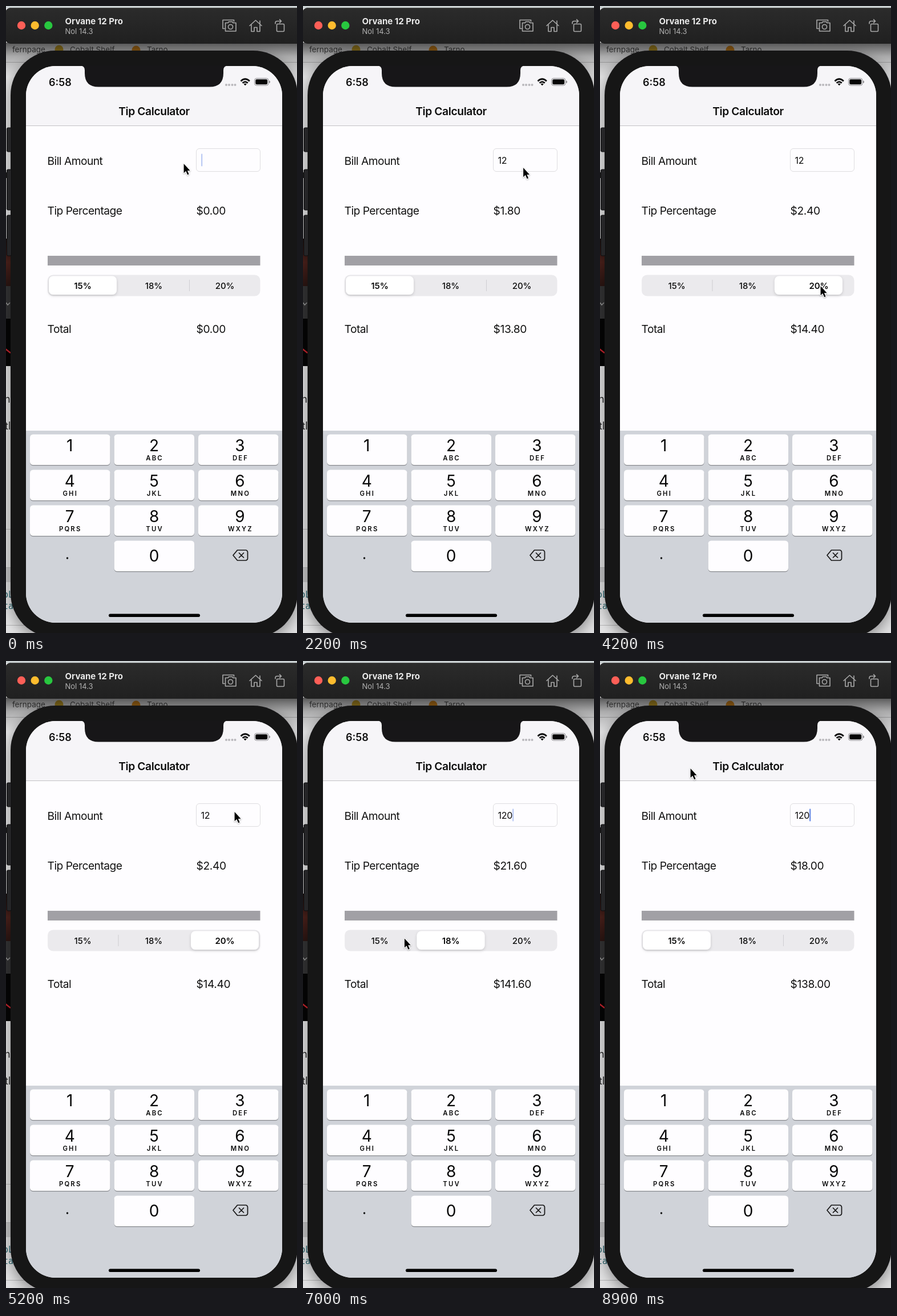
Recreate the animation shown at these times as an HTML page. Size 510 by 1097 pixels, loop 9 s.

```html
<!DOCTYPE html>
<html lang="en">
<head>
<meta charset="utf-8">
<title>Tip Calculator</title>
<style>
html, body { margin: 0; width: 100%; height: 100%; overflow: hidden; background: #e4e4e5; }
svg { display: block; width: 510px; height: 1097px; font-family: Inter, "Liberation Sans", sans-serif; }
.label { font-size: 19.2px; letter-spacing: -.5px; fill: #111; }
.value { letter-spacing: -.35px; }
.mid { text-anchor: middle; }
.seg { font-size: 15px; font-weight: 500; fill: #0c0c0c; text-anchor: middle; letter-spacing: -.1px; }
.digit { font-size: 28px; text-anchor: middle; fill: #080808; }
.letters { font-size: 11.3px; font-weight: 600; letter-spacing: 2.2px; text-anchor: middle; fill: #080808; }
.icon { fill: none; stroke: #a9a9a9; stroke-width: 1.6; stroke-linejoin: round; stroke-linecap: round; }
</style>
</head>
<body>
<svg viewBox="0 0 510 1097">
  <defs>
    <linearGradient id="shade" x2="0" y2="1">
      <stop offset="0" stop-opacity=".62"/>
      <stop offset=".4" stop-opacity=".25"/>
      <stop offset="1" stop-opacity="0"/>
    </linearGradient>
    <linearGradient id="title" x2="0" y2="1">
      <stop offset="0" stop-color="#2b2b2b"/>
      <stop offset="1" stop-color="#202020"/>
    </linearGradient>
    <linearGradient id="photo" x2="0" y2="1">
      <stop offset="0" stop-color="#1d0f0e"/>
      <stop offset=".5" stop-color="#4c211b"/>
      <stop offset="1" stop-color="#2a1512"/>
    </linearGradient>
    <filter id="soft" x="-20%" y="-30%" width="140%" height="180%">
      <feDropShadow dx="0" dy="2" stdDeviation="2.5" flood-opacity=".16"/>
    </filter>
    <filter id="drop" x="-50%" y="-50%" width="200%" height="200%">
      <feDropShadow dx="0" dy="1" stdDeviation="1" flood-opacity=".35"/>
    </filter>
    <filter id="glow">
      <feDropShadow dx="0" dy="8" stdDeviation="13" flood-opacity=".4"/>
    </filter>
  </defs>

  <!-- desktop behind the simulator -->
  <rect width="510" height="1097" fill="#e4e4e5"/>
  <rect width="510" height="4" fill="#cbd2d4"/>
  <g font-size="13.5" fill="#4b4b4b">
    <text x="11" y="81">fernpage</text>
    <circle cx="93" cy="76" r="7.5" fill="#c9a227"/>
    <text x="112" y="81">Cobalt Shelf</text>
    <circle cx="228" cy="77" r="7.5" fill="#d98a1c"/>
    <text x="247" y="81">Tarno</text>
  </g>
  <rect y="98" width="510" height="1" fill="#b4b4b5"/>
  <rect y="407" width="12" height="83" fill="url(#photo)"/>
  <rect y="490" width="12" height="57" fill="#343435"/>
  <path d="M0 519l3 4 4-4" fill="none" stroke="#999" stroke-width="1.5"/>
  <rect y="547" width="12" height="83" fill="#050505"/>
  <path d="M-1 600l9 7" stroke="#c8242e" stroke-width="2.5"/>
  <g font-size="18" fill="#222">
    <text x="-8" y="301">u</text>
    <text x="-3" y="694">n</text>
    <text x="-2" y="741">tl</text>
  </g>
  <path d="M0 915.500H12M0 982.500H12M0 1083.500H40" stroke="#b5b5b6"/>
  <rect y="983" width="12" height="25" fill="#c8c8c9"/>
  <g font-size="15" fill="#24626b" font-family="'DejaVu Sans Mono', monospace">
    <text x="-5" y="1035">oL</text>
    <text x="-5" y="1055">ta</text>
  </g>
  <rect y="64" width="510" height="60" fill="url(#shade)"/>

  <!-- phone -->
  <rect x="8" y="78" width="503" height="1027" rx="78" fill="#171618" filter="url(#glow)"/>
  <g fill="#252527" stroke="#0d0d0e">
    <rect x="1.500" y="213" width="8" height="42" rx="2"/>
    <rect x="1.500" y="286" width="8" height="71" rx="2"/>
    <rect x="1.500" y="366" width="8" height="71" rx="2"/>
  </g>
  <rect x="35" y="105" width="449" height="974" rx="52" fill="#fefdff"/>
  <path d="M35 210V157a52 52 0 0 1 52-52H432a52 52 0 0 1 52 52V210Z" fill="#f6f5f8"/>
  <path d="M35 209.500H484" stroke="#c2c1c5"/>
  <path d="M130 104.500q8 0 8 8v5q0 24 24 24H357q24 0 24-24v-5q0-8 8-8Z" fill="#171618"/>
  <text x="75" y="139.500" font-size="18" font-weight="600" fill="#111">6:58</text>
  <g fill="#b9b8bc">
    <circle cx="386" cy="138" r="2"/><circle cx="391" cy="138" r="2"/>
    <circle cx="396.500" cy="138" r="2"/><circle cx="401.500" cy="138" r="2"/>
  </g>
  <g fill="none" stroke="#0a0a0a" stroke-width="2.700">
    <path d="M411.500 131.500q7.700-7.500 15.400 0M414.600 134.800q4.600-4.400 9.200 0"/>
  </g>
  <path d="M416.600 136.600q2.600-2.200 5.200 0l-2.600 2.700Z" fill="#0a0a0a"/>
  <rect x="435.500" y="126.500" width="24.500" height="12.500" rx="3.600" fill="none" stroke="#8b8a8e"/>
  <rect x="437.200" y="128.200" width="21" height="9" rx="2.200" fill="#050505"/>
  <path d="M461.600 130.800q2 2 0 4Z" fill="#8b8a8e" stroke="#8b8a8e"/>
  <text class="mid" x="259.500" y="190.800" font-size="19.2" font-weight="600" letter-spacing="-.35" fill="#0c0c0c">Tip Calculator</text>

  <!-- form -->
  <g class="label">
    <text x="72.500" y="277.500">Bill Amount</text>
    <text x="72.500" y="365">Tip Percentage</text>
    <text x="72.500" y="571.500">Total</text>
    <text id="tip" class="value" x="333.500" y="365"></text>
    <text id="total" class="value" x="333.500" y="571.500"></text>
  </g>
  <rect x="333.500" y="249.500" width="112" height="40" rx="5.500" fill="#fefdff" stroke="#dedde0"/>
  <text id="bill" x="341.500" y="275.500" font-size="16" letter-spacing="-.25" fill="#0c0c0c"></text>
  <rect id="caret" y="258.500" width="2.300" height="22" rx="1" fill="#3563dd"/>
  <rect x="73" y="437" width="372.500" height="17" fill="#a1a0a5"/>
  <rect x="73" y="470.500" width="372.500" height="37" rx="9.500" fill="#ebeaed"/>
  <rect class="divider" x="196.500" y="479" width="1" height="20" fill="#cfced2"/>
  <rect class="divider" x="321" y="479" width="1" height="20" fill="#cfced2"/>
  <rect id="thumb" y="472.500" width="119" height="32.500" rx="8" fill="#fff" filter="url(#soft)"/>
  <text class="seg" x="134.500" y="494.500">15%</text>
  <text class="seg" x="259" y="494.500">18%</text>
  <text class="seg" x="383.500" y="494.500">20%</text>

  <!-- keypad -->
  <path d="M35 743H484V1027a52 52 0 0 1-52 52H87a52 52 0 0 1-52-52Z" fill="#d0d3d9"/>
  <g id="keys"></g>
  <circle cx="107.500" cy="966" r="1.700"/>
  <path d="M405.500 952H420a3.500 3.500 0 0 1 3.500 3.500v11a3.500 3.500 0 0 1-3.500 3.500H405.500L398 961ZM408.500 957l8 8m0-8l-8 8" fill="none" stroke="#141414" stroke-width="1.700" stroke-linejoin="round" stroke-linecap="round"/>
  <rect x="180" y="1063.500" width="160" height="5.600" rx="2.800"/>

  <!-- window title bar -->
  <rect x="-1" y="3" width="530" height="63" rx="9" fill="url(#title)"/>
  <path d="M8 3.500H510" stroke="#4a4a4a"/>
  <circle cx="27" cy="34" r="7.200" fill="#fe5f57"/>
  <circle cx="50.700" cy="34" r="7.200" fill="#febc2e"/>
  <circle cx="74.300" cy="34" r="7.200" fill="#28c73f"/>
  <text x="103.500" y="32" font-size="15" font-weight="700" fill="#e9e9e9">Orvane 12 Pro</text>
  <text x="103.500" y="49" font-size="13" fill="#b1b1b1">Nol 14.3</text>
  <g class="icon">
    <path d="M383 39.500H380V24.500H399.500V27M386.500 29.500H389l1.500-2h6l1.500 2h5V44H384.500V29.500Z"/>
    <circle cx="393.500" cy="36.500" r="4"/>
    <path d="M427 34.500L437.500 25 448 34.500M430 33V44.500H435V37.500H440V44.500H445V33M445 31V26"/>
    <rect x="474.500" y="31.500" width="13" height="13" rx="1.500"/>
    <path d="M472 31v-1.500q0-3 3-3H482M479.500 23.500l3 3-3 3"/>
  </g>

  <path id="cursor" d="M.6 1V17.200L4.300 13.800 7.100 20.300 9.600 19.200 6.900 12.900H11.600Z" fill="#050505" stroke="#fff" stroke-width="2" paint-order="stroke" stroke-linejoin="round" filter="url(#drop)"/>
</svg>
<script>
const $ = id => document.getElementById(id);
const clamp = v => Math.max(0, Math.min(1, v));
const LOOP = 9000, STEP = 100;
const rates = [.15, .18, .2];
const segs = [...document.querySelectorAll(".seg")];
const dividers = document.querySelectorAll(".divider");

// [time, value]
const typed = [[0, ""], [1300, "1"], [1500, "12"], [5700, "120"]];
const picks = [[0, 0], [3100, 1], [4010, 2], [6500, 1], [7250, 0]];
// [start, end, x, y]
const moves = [
  [0, 1, 311, 275], [300, 700, 408, 268], [700, 1100, 385.5, 282],
  [2200, 2900, 268.5, 488.5], [3400, 3900, 386, 489], [4400, 4900, 400, 263],
  [5800, 6350, 278, 493], [6650, 7150, 149.5, 482], [7750, 8400, 152, 233],
  [8500, 8700, 156, 186], [8800, 8900, 158, 187]
];

const keyLetters = ["", "ABC", "DEF", "GHI", "JKL", "MNO", "PQRS", "TUV", "WXYZ"];
const keyMids = [111.7, 259.6, 410];
const key = (digit, letters, col, row) => {
  const x = 42 + col * 147.5, y = 749.5 + row * 62, mid = keyMids[col];
  const base = y + (digit ? 29 : 36);
  return `<rect x="${x}" y="${y + 1.3}" width="140.5" height="53.5" rx="5.5" fill="#898b8f"/>
    <rect x="${x}" y="${y}" width="140.5" height="53.5" rx="5.5" fill="#fefdff"/>
    <text class="digit" x="${mid}" y="${base}">${digit}</text>
    <text class="letters" x="${mid + 1}" y="${y + 45.5}">${letters}</text>`;
};
$("keys").innerHTML =
  keyLetters.map((s, i) => key(i + 1, s, i % 3, Math.floor(i / 3))).join("") + key(0, "", 1, 3);

const lastBefore = (list, t) => list.filter(e => e[0] <= t).pop();

function cursorAt(t) {
  let [, , x, y] = moves[0];
  for (const [a, b, nx, ny] of moves) {
    const u = clamp((t - a) / (b - a)), e = u * u * (3 - 2 * u);
    x += (nx - x) * e;
    y += (ny - y) * e;
  }
  return [x, y];
}

function thumbAt(t) {
  let pos = 0;
  for (const [start, to] of picks) {
    pos += (to - pos) * (1 - (1 - clamp((t - start) / 400)) ** 3);
  }
  return pos;
}

function draw(t) {
  const bill = lastBefore(typed, t)[1], pick = lastBefore(picks, t)[1];
  const tip = bill * rates[pick];
  $("bill").textContent = bill;
  $("tip").textContent = "$" + tip.toFixed(2);
  $("total").textContent = "$" + (+bill + tip).toFixed(2);

  const phase = (t / 1000 + .9) % 1 + .1;
  $("caret").setAttribute("x", 342 + (bill ? $("bill").getComputedTextLength() - .6 : 0));
  $("caret").setAttribute("opacity", clamp(Math.min((phase - .25) / .12, (1.08 - phase) / .25)));

  const pos = thumbAt(t);
  $("thumb").setAttribute("x", 75 + pos * 124.5);
  dividers[0].setAttribute("opacity", clamp((pos - 1) * 2));
  dividers[1].setAttribute("opacity", clamp((1 - pos) * 2));
  segs.forEach((s, i) => {
    const pressed = picks.some(([at, to]) => to === i && t < at && t > at - 110);
    s.style.fontWeight = i === pick ? 600 : 500;
    s.style.opacity = pressed ? .75 : 1;
  });
  $("cursor").setAttribute("transform", `translate(${cursorAt(t)})`);
}

function tick(now) {
  draw(Math.floor(now % LOOP / STEP) * STEP);
  requestAnimationFrame(tick);
}
draw(0);
requestAnimationFrame(tick);
</script>
</body>
</html>
```
